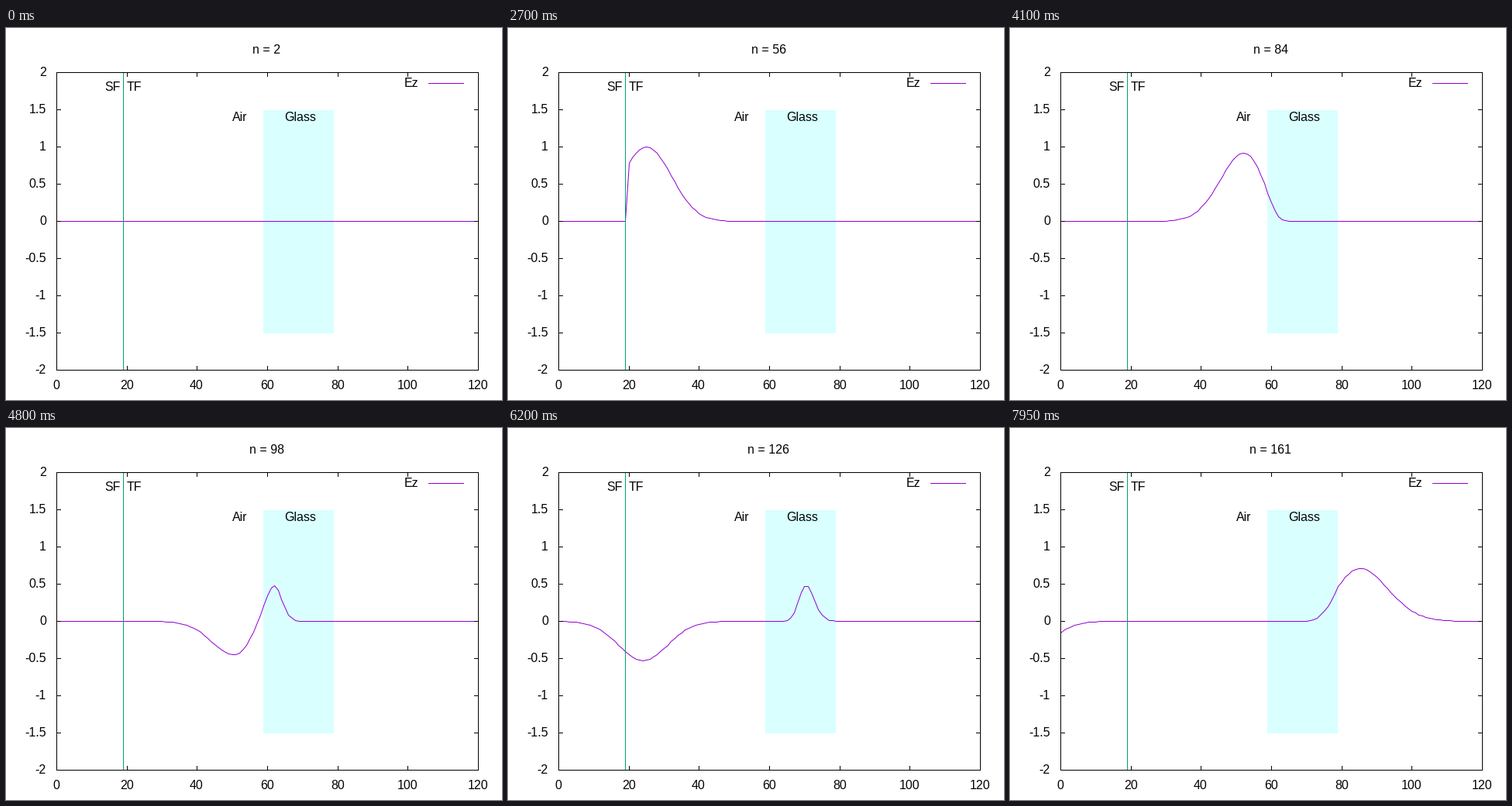
These frames come from a looping animation (640 px wide and 480 px high, 8000 ms). A matplotlib script:

```python
import numpy as np
import matplotlib.pyplot as plt
from matplotlib.animation import FuncAnimation
from matplotlib.patches import Rectangle

plt.rcParams.update({
    "font.family": "Liberation Sans",
    "font.size": 14.4,          # 16 px at 80 dpi
    "text.hinting": "default",
    "path.snap": False,
})

FRAMES, FIRST_STEP = 160, 2
CELLS, BOUNDARY = 121, 20       # grid nodes, first total-field node
PURPLE, GREEN = "#9400d3", "#009e73"
PX = 0.9                        # one pixel in points
LEFT, RIGHT, TOP, BOTTOM = 65, 609, 57, 441


def px(x):
    return LEFT + x * (RIGHT - LEFT) / 120


def py(y):
    return (TOP + BOTTOM) / 2 - y * (BOTTOM - TOP) / 4


def pulse(t):
    return np.exp(-(t - 51) ** 2 / 100)


def simulate(steps):
    """1D FDTD with a total-field/scattered-field source and a glass slab."""
    eps = np.ones(CELLS)
    eps[60:80] = 10
    e, h = np.zeros(CELLS), np.zeros(CELLS - 1)
    history = [e.copy()]
    for n in range(1, steps + 1):
        h += e[1:] - e[:-1]
        h[BOUNDARY - 1] -= pulse(n - 1)
        ends = e[1], e[-2]
        e[1:-1] += (h[1:] - h[:-1]) / eps[1:-1]
        e[BOUNDARY] += pulse(n)
        e[0], e[-1] = ends      # absorbing ends
        history.append(e.copy())
    return history


field = simulate(FRAMES + FIRST_STEP)

# Whole numbers are pixel centres
fig = plt.figure(figsize=(8, 6), dpi=80, facecolor="white")
ax = fig.add_axes([0, 0, 1, 1])
ax.set_xlim(-0.5, 639.5)
ax.set_ylim(479.5, -0.5)
ax.axis("off")


def line(xs, ys, color="black", z=3):
    return ax.plot(xs, ys, color=color, lw=PX, zorder=z,
                   solid_capstyle="projecting", solid_joinstyle="miter")[0]


def label(x, y, text, ha="left"):
    return ax.text(x, y, text, ha=ha, va="baseline", zorder=6)


ax.add_patch(Rectangle((331.5, 105.5), 91, 288, fc="#d9ffff", lw=0, zorder=1))

# Frame, ticks and tick labels
line([LEFT, RIGHT, RIGHT, LEFT, LEFT], [TOP, TOP, BOTTOM, BOTTOM, TOP], z=5)
for v in np.arange(-2, 2.1, 0.5):
    y = py(v)
    line([LEFT, LEFT + 5], [y, y])
    line([RIGHT - 5, RIGHT], [y, y])
    label(51.5, y + 4.5, f"{v:g}", "right")
for v in range(0, 121, 20):
    x = round(px(v))
    line([x, x], [BOTTOM - 5, BOTTOM])
    line([x, x], [TOP, TOP + 5])
    label(x - 0.7, 465.5, str(v), "center")

line([151, 151], [TOP, BOTTOM], GREEN, z=4)
line([545, 590], [71, 71], PURPLE)
label(531.5, 75.5, "Ez", "right")
label(126.5, 80.5, "SF")
label(155.5, 80.5, "TF")
label(291.5, 119.5, "Air")
label(358.5, 119.5, "Glass")

title = label(335.5, 32.5, "", "center")
xs = np.round(px(np.arange(CELLS)))
curve = line([], [], PURPLE, z=2)
curve.set_solid_joinstyle("round")


def draw(i):
    n = i + FIRST_STEP
    curve.set_data(xs, np.round(py(field[n])))
    title.set_text(f"n = {n}")
    return curve, title


anim = FuncAnimation(fig, draw, frames=FRAMES, interval=50,
                     repeat=True, repeat_delay=0, blit=False)
plt.show()
```
